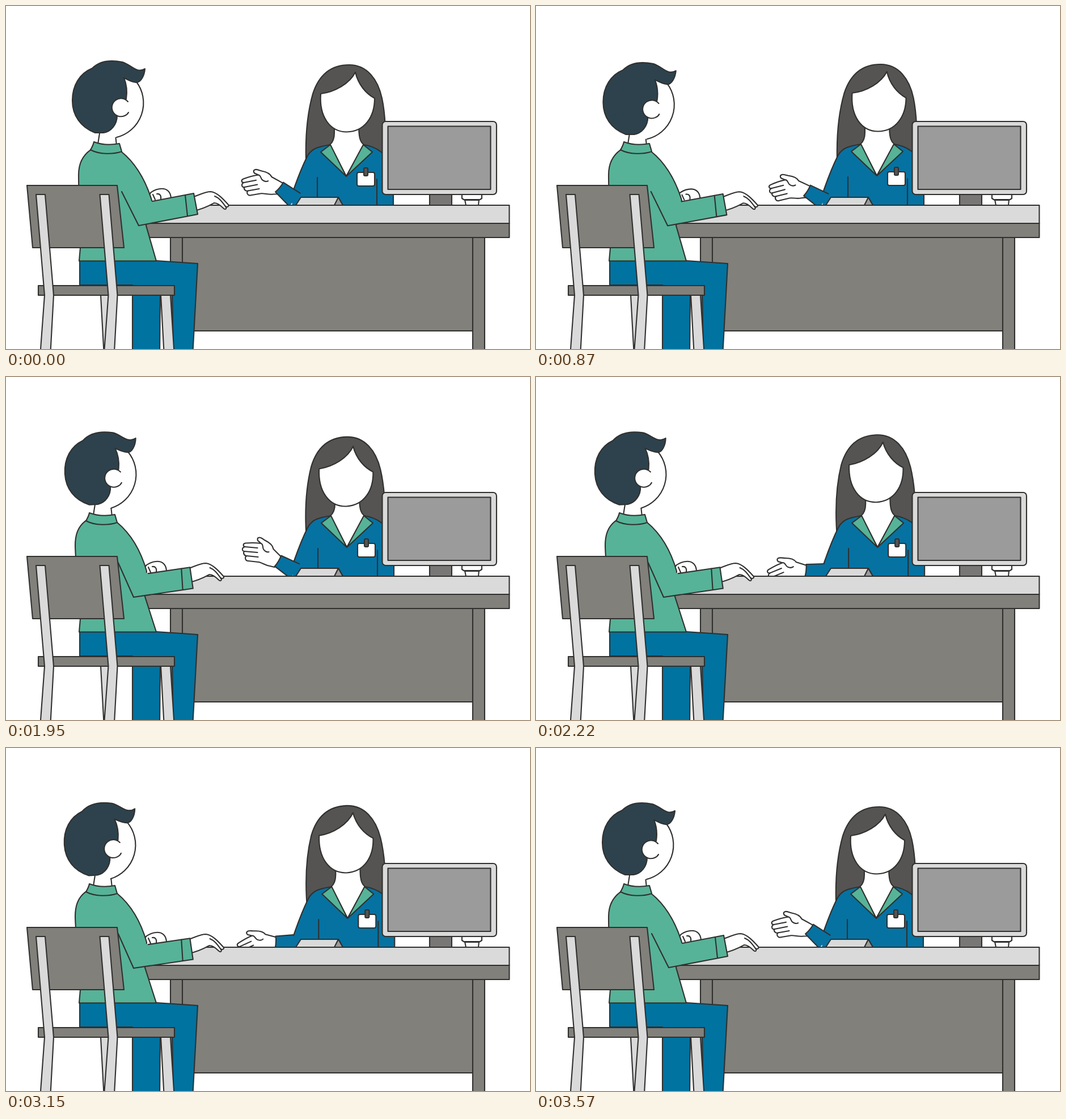
An HTML page for the animation above (3600 ms loop, 924x606 px).

```html
<!DOCTYPE html>
<html lang="en">
<head>
<meta charset="utf-8">
<title>Conversation at a desk</title>
<style>
html, body { margin: 0; width: 100%; height: 100%; overflow: hidden; background: #fff; }
svg { display: block; width: 100vw; height: 100vh; stroke: #30302f; stroke-width: 2.1; stroke-linejoin: round; stroke-linecap: round; fill: none; }
.white { fill: #fff; }
.light { fill: #dadada; }
.grey { fill: #81807b; }
.stand { fill: #787776; }
.screen { fill: #9c9b9b; }
.dark { fill: #555453; }
.green { fill: #56b397; }
.blue { fill: #0672a2; }
.jeans { fill: #0073a0; }
.navy { fill: #2d424d; }
.bare { stroke: none; }
</style>
</head>
<body>
<svg viewBox="0 0 924 606">
  <!-- clerk -->
  <g id="hair">
    <path class="dark" d="M529 272C528 236 530 194 541 155C552 121 574 104 605 104C637 104 656 130 663 163C669 191 670 226 670 275Z"/>
  </g>
  <g id="clerkBody">
    <path class="white" d="M579 208V224C579 236 575 242 571 245L600 301L631 245C624 240 622 232 622 208"/>
    <path class="blue bare" d="M572 245C555 248 539 250 531 266C523 282 512 310 504.500 332V356H683V300C677 262 655 249 630 245L600 301Z"/>
    <path d="M504.500 332C512 310 523 282 531 266C539 250 555 248 572 245M630 245C655 249 677 262 683 300V356M549 303V338M654 306V356"/>
    <path class="green" d="M572 245L555 258L600 301ZM630 245L646 258L600 301Z"/>
    <rect class="white" x="619" y="294" width="31" height="24" rx="3"/>
    <rect class="dark" x="631" y="286" width="7" height="14" rx="2"/>
  </g>
  <g id="face">
    <path class="white" d="M616 117C606 137 580 152 555 155C552 195 571 222.500 601 222.500C632 222 650 196 650 163C635 155 621 139 616 117Z"/>
  </g>
  <g id="clerkHand">
    <path class="white" d="M491 316L474 299C473 292 466 287 460 284C455 281 452 278 449 278.500C445 279 445 284 449 286L452 289C445 288 432 288 425 288.500C420 289 420 294 424 295C418 296 418 303 423 303C420 305 422 311 427 311C423 313 424 320 430 320L448 322C454 323 460 328 468 329L476 331Z"/>
    <path d="M424 295L446 297M423 303L446 305M427 311L447 313M452 289C457 290 454 297 457 300C459 303 463 305 466 304"/>
  </g>
  <g id="forearm">
    <path id="sleeve" class="blue"/>
  </g>

  <!-- desk -->
  <path class="light" d="M511 352L520 338H586L594 352Z"/>
  <path class="screen" d="M586 338L579 352H594Z"/>
  <path class="grey" d="M290 409H311V620H290ZM311 409H823V574H311ZM823 409H844V620H823Z"/>
  <rect class="light" x="200" y="352" width="687.500" height="32"/>
  <rect class="grey" x="200" y="384" width="687.500" height="25"/>
  <rect class="stand" x="747" y="333" width="39" height="19"/>
  <path class="white" d="M809 342L811 352H833L834 342ZM804 333H839V340L834 343H809L804 340Z"/>
  <rect class="light" x="663.500" y="204" width="201.500" height="129" rx="6"/>
  <rect class="screen" x="673.500" y="212.500" width="181" height="111.500"/>

  <!-- visitor -->
  <g id="farHand">
    <path class="white" d="M245 342L256 329C262 325 269 322 278 323C286 324 291 331 291 341L262 347Z"/>
    <path d="M259 333L263 342M266 332C271 331 274 335 273 341"/>
  </g>
  <path class="light" d="M167 511L173 620H190V511Z"/>
  <path class="jeans" d="M130 450H265L338 455L329 620H295L293 505H272L271 620H223V493H130Z"/>
  <path class="light" d="M273 511H290L297 620H279Z"/>
  <path id="torso" class="green"/>
  <g id="nearHand">
    <path class="white" d="M328 338C344 333 350 328 361 328C372 329 383 341 392 351C394 354 390 356 387 354C390 358 387 361 383 357C378 352 373 348 367 348C360 352 350 358 328 363Z"/>
    <path d="M387 354C381 346 376 339 368 336"/>
  </g>
  <g id="arm">
    <path class="green" d="M204 328L234 388L338 368L331 331L258 345"/>
    <path d="M316 334L320 371"/>
  </g>
  <g id="collar">
    <path class="white" d="M165 225L162 244L195 247L193 228"/>
    <path class="green" d="M155 240C168 245 184 246 200 243L204 257C190 262 165 263 149 254C152 249 154 245 155 240Z"/>
  </g>
  <g id="head">
    <path class="white bare" d="M168 224L208 125L230 134A62.500 62.500 0 0 1 195 232L170 230Z"/>
    <path d="M230 134A62.500 62.500 0 0 1 195 232"/>
    <path class="navy" d="M157 224C131 214 117 193 117 167C117 140 130 119 152 110C165 97 185 95 205 99C220 103 230 120 245 111C244 124 237 136 229 135C220 134 214 130 208 127C213 139 214 151 212 164L196 193C196 210 185 222 172 224Z"/>
    <path class="white bare" d="M215 169A16 16 0 1 0 216 188Z"/>
    <path d="M215 169A16 16 0 1 0 209 194Q214 192 216 188"/>
  </g>

  <!-- chair -->
  <path class="grey" d="M37 317H196L208 427H47Z"/>
  <rect class="grey" x="57" y="494" width="240" height="17"/>
  <path id="post" class="light" d="M53 333H69L84 511L78 620H60L68 511Z"/>
  <use href="#post" x="112.500"/>
</svg>
<script>
const LOOP = 3600, TICK = 30;
const $ = id => document.getElementById(id);

const rest = {
  lean: 0, slide: 0, headX: 0, headY: 0, headTilt: 0,
  bodyX: 0, bodyY: 0, hairX: 0, hairY: 0, hairTilt: 0, nod: 0,
  cuffX: 482, cuffY: 320, armTilt: 39.5, handTilt: -16, reach: 35
};
const leaning = { lean: 1, slide: 1, headX: -9.5, headY: 0, headTilt: -3.5 };
const upright = { ...leaning, headX: -9, headY: .5, headTilt: -3.1 };
const offering = {
  ...rest, slide: .2, headX: 1, headY: 3, headTilt: .3, bodyX: 1, bodyY: -1,
  hairX: 2, hairY: -1, hairTilt: .3, cuffX: 478, cuffY: 326, armTilt: 32, handTilt: -20
};
const open = { ...rest, ...leaning, handTilt: 0 };
const nodding = {
  ...open, ...upright, bodyX: 1, hairY: 2, hairTilt: -1.5, nod: 4,
  cuffX: 479.5, cuffY: 325, armTilt: 31
};
const lowered = {
  ...rest, ...upright, bodyX: 2.3, hairX: 1, hairY: -2, hairTilt: -2,
  cuffX: 475, cuffY: 343.5, armTilt: 3, handTilt: -30, reach: 31
};

const keys = [
  [0, rest], [300, rest], [870, offering], [1350, open], [1680, open],
  [1950, nodding], [2280, lowered], [2670, lowered],
  [3150, { ...lowered, ...leaning }], [3570, rest], [LOOP, rest]
];

function poseAt(time) {
  const i = keys.findIndex(key => key[0] > time);
  const [start, from] = keys[i - 1], [end, to] = keys[i];
  const u = (time - start) / (end - start), k = u * u * (3 - 2 * u);
  const pose = {};
  for (const name in rest) pose[name] = from[name] + (to[name] - from[name]) * k;
  return pose;
}

function move(id, x, y, tilt = 0, px = 0, py = 0) {
  $(id).setAttribute("transform", `translate(${x} ${y}) rotate(${tilt} ${px} ${py})`);
}

function draw(time) {
  const p = poseAt(time), s = p.lean, a = p.slide;
  move("hair", p.hairX, p.hairY, p.hairTilt, 600, 265);
  move("face", p.hairX, p.hairY + p.nod, p.hairTilt, 600, 265);
  move("clerkBody", p.bodyX, p.bodyY);
  move("clerkHand", p.cuffX - rest.cuffX, p.cuffY - rest.cuffY, p.handTilt, rest.cuffX, rest.cuffY);
  move("forearm", p.cuffX, p.cuffY, p.armTilt);
  $("sleeve").setAttribute("d", `M${p.reach} -15L0 -11Q2 0 0 11L35 15L45 20V0Z`.replace("L45 20V0Z", ""));

  move("head", p.headX, p.headY, p.headTilt, 180, 245);
  move("collar", -8 * s, 0);
  move("arm", -9 * a, a, 2.5 * a, 234, 388);
  move("nearHand", -8.5 * a, a);
  move("farHand", -8 * a, 3 * a);
  $("torso").setAttribute("d",
    `M${151 - 9 * s} 253C${134 - 8 * s} 264 ${128 - 6 * s} 280 ${128 - 6 * s} 298` +
    `C${128 - 5 * s} 340 131 390 131 427L129 450.5H265L${247 - 2 * s} 388` +
    `L${257 - 9 * s} 343C${246 - 8 * s} 308 ${228 - 8 * s} 277 ${203 - 7 * s} 257Z`);
}

const began = performance.now();
function frame() {
  const time = (performance.now() - began) % LOOP;
  draw(Math.floor(time / TICK) * TICK);
  requestAnimationFrame(frame);
}
frame();
</script>
</body>
</html>
```
